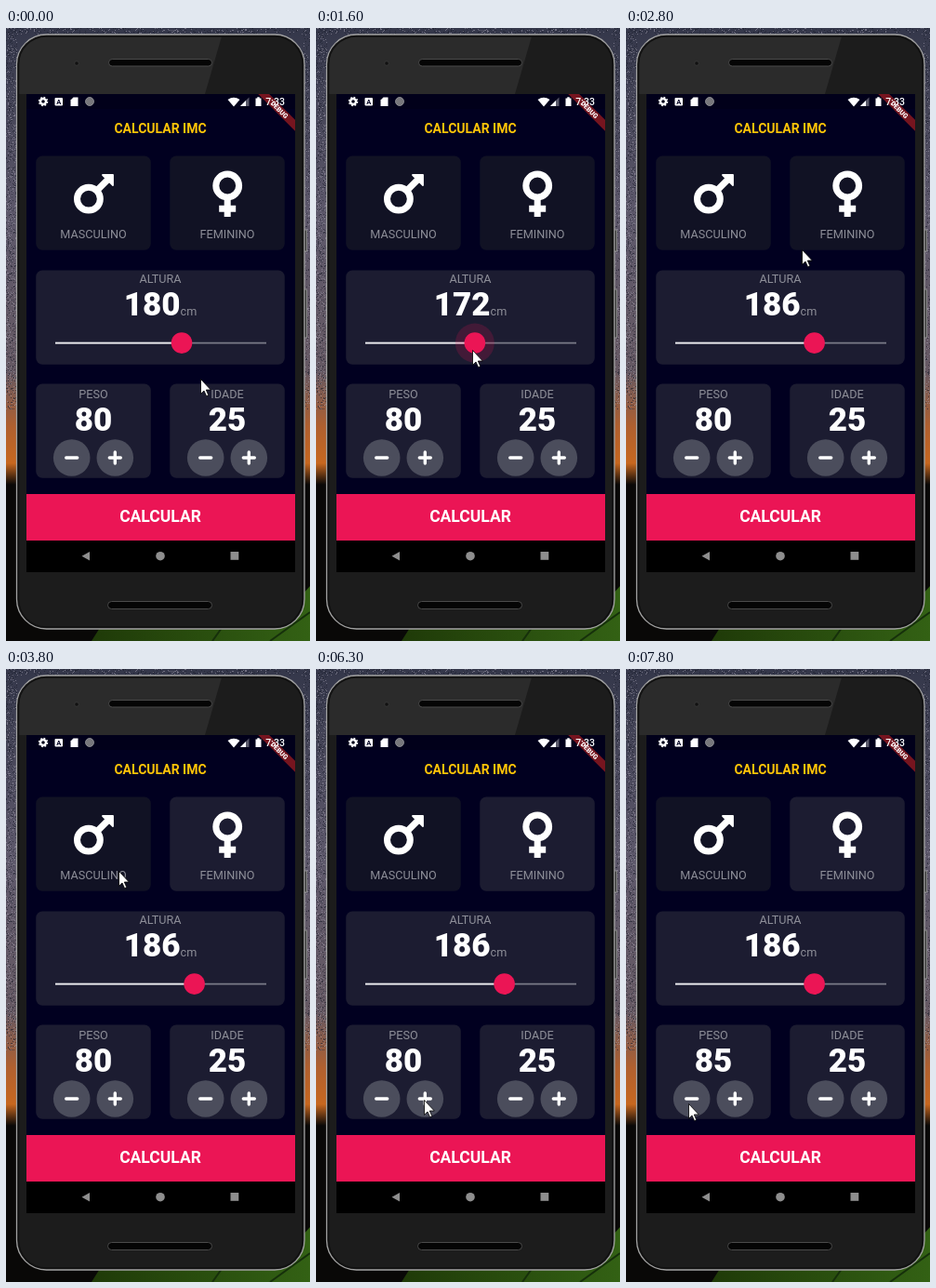
An HTML page that plays this animation: 327 by 659 pixels, repeating every 8 s.

```html
<!DOCTYPE html>
<html lang="pt">
<head>
<meta charset="utf-8">
<title>Calcular IMC</title>
<style>
  html, body { margin: 0; width: 100%; height: 100%; overflow: hidden; background: #090807; }
  svg { display: block; width: 327px; height: 659px; font-family: Roboto, sans-serif; }
  text { text-anchor: middle; }
  .card { fill: #1c1c31; }
  .off { fill: #111224; }
  .label { font-size: 12.65px; fill: #8d8e98; }
  .num { font-size: 35px; font-weight: 900; fill: #fff; }
  .icon { fill: none; stroke: #fff; stroke-width: 7; }
  .sign { stroke: #fff; stroke-width: 3.4; stroke-linecap: round; }
</style>
</head>
<body>
<svg viewBox="0 0 327 659">
  <defs>
    <linearGradient id="sky" x2="0" y2="1">
      <stop offset="0" stop-color="#34374a"/>
      <stop offset=".3" stop-color="#5d586b"/>
      <stop offset=".56" stop-color="#665963"/>
      <stop offset=".65" stop-color="#b0602f"/>
      <stop offset=".71" stop-color="#c7671f"/>
      <stop offset=".745" stop-color="#090807"/>
    </linearGradient>
    <linearGradient id="tent">
      <stop offset="0" stop-color="#1f3a08"/>
      <stop offset="1" stop-color="#336114"/>
    </linearGradient>
    <clipPath id="screen"><path d="M22 71H311V585H22Z"/></clipPath>
  </defs>

  <!-- Night landscape -->
  <rect width="327" height="659" fill="url(#sky)"/>
  <path id="dark" fill="#1a1d2b" opacity=".6"/>
  <path id="light" fill="#aaa6b6" opacity=".5"/>
  <path d="M92 659L104 640H290L327 600V659Z" fill="url(#tent)"/>
  <path d="M327 628L284 659M232 645L222 659" stroke="#16300b" stroke-width="2"/>

  <!-- Phone -->
  <path d="M320 217h3.500v23H320zM320 281h3.500v52H320z" fill="#333" stroke="#8c8c8c"/>
  <rect x="11.500" y="7" width="309.500" height="639" rx="32" fill="#1c1c1c" stroke="#a2a2a2" stroke-width="1.300"/>
  <path d="M13.500 71V40Q14 9 44 9H232L214 71Z" fill="#2b2b2b"/>
  <rect x="13.500" y="9" width="305.500" height="635" rx="30" fill="none" stroke="#111" stroke-width="1.500"/>
  <circle cx="76" cy="38" r="2.300" fill="#111" stroke="#3c3c3c" stroke-width=".8"/>
  <g fill="#050505" stroke="#4a4a4a">
    <rect x="110.500" y="33.500" width="111" height="7.500" rx="3.700"/>
    <rect x="109.500" y="616.500" width="112" height="8" rx="4"/>
  </g>

  <!-- Screen and status bar -->
  <g clip-path="url(#screen)">
    <rect width="327" height="659" fill="#010020"/>
    <rect width="327" height="87" fill="#01001a"/>
    <g transform="rotate(45 311 71)">
      <path d="M271 90.700h80v8.400h-80z" fill="#76151f"/>
      <text x="311" y="97.400" font-size="7.200" font-weight="900" fill="#fff">DEBUG</text>
    </g>
  </g>
  <g fill="#fff">
    <circle cx="40" cy="79" r="3" fill="none" stroke="#fff" stroke-width="2.400"/>
    <circle cx="40" cy="79" r="4.600" fill="none" stroke="#fff" stroke-width="1.300" stroke-dasharray="1.800 1.810"/>
    <rect x="52.500" y="75" width="8.500" height="8.500" rx="1"/>
    <text x="56.750" y="82" font-size="7.500" font-weight="700" fill="#010020">A</text>
    <path d="M72.500 74.500h5v9.500h-8v-6.500z"/>
    <circle cx="90" cy="79" r="4.500" fill="#77777b" stroke="#98989c" stroke-width=".8"/>
    <path d="M238.500 77q6.500-4.500 13 0L245 84.500z"/>
    <path d="M261.500 74.500V84H252z" opacity=".35"/>
    <path d="M258 78V84H252z"/>
    <path d="M268.500 75.500h1.800v-1.200h2.400v1.200h1.800V84h-6z"/>
    <text x="289.500" y="83" font-size="10.500" font-weight="500">7:33</text>
  </g>
  <text x="166" y="112.500" font-size="14" font-weight="700" fill="#ffc507">CALCULAR IMC</text>

  <g id="cards"></g>

  <!-- Gender icons -->
  <circle class="icon" cx="88.900" cy="183.700" r="12.400"/>
  <path class="icon" d="M98 174.500L111 161.500"/>
  <path d="M104 158h11v11z" fill="#fff" stroke="#fff" stroke-width="1.800" stroke-linejoin="round"/>
  <circle class="icon" cx="238.200" cy="169.500" r="12.400"/>
  <path class="icon" d="M238.200 183v20M229.200 194.200h18"/>

  <!-- Height slider -->
  <text x="166" y="309"><tspan id="height" class="num">180</tspan><tspan class="label">cm</tspan></text>
  <path d="M53 338.600H280" stroke="#7a7b88" stroke-width="1.600"/>
  <path id="track" stroke="#ececf0" stroke-width="1.800"/>
  <g id="knob" fill="#eb1555">
    <circle id="halo" opacity=".18"/>
    <circle r="11.300"/>
  </g>

  <path d="M22 501H311V551H22Z" fill="#eb1555"/>
  <text x="166" y="530.500" font-size="17.500" font-weight="700" fill="#fff">CALCULAR</text>
  <path d="M22 551H311V585H22Z"/>
  <g fill="#8e8e8e">
    <path d="M90 563v9.500l-8.500-4.750z"/>
    <circle cx="166" cy="567.700" r="4.800"/>
    <path d="M241.500 563h8.800v8.800h-8.800z"/>
  </g>

  <path id="cursor" d="M.5.5V16.300L4 13 6.600 18.700 8.800 17.800 6.300 12H11.300Z" fill="#fff" stroke="#000" stroke-width=".8"/>
</svg>

<script>
const $ = id => document.getElementById(id);
const clamp = (v, lo, hi) => Math.min(hi, Math.max(lo, v));
const LOOP = 8000, STEP = 100;
const LEFT = 94, RIGHT = 238, MIDDLE = 166;

// Static parts
const card = (id, cx, y, w, label, labelY) =>
  `<rect id="${id}" class="card" x="${cx - w / 2}" y="${y}" width="${w}" height="101.3" rx="7"/>
   <text class="label" x="${cx}" y="${labelY}">${label}</text>`;

const button = (id, x, sign) =>
  `<g transform="translate(${x} 462)"><circle id="${id}" r="19.8" fill="#4b4d5c"/>
   <path class="sign" d="${sign}"/></g>`;

const counter = (id, cx, label, value) =>
  card(id + 'Card', cx, 382.5, 123.5, label, 398) +
  `<text id="${id}" class="num" x="${cx}" y="433">${value}</text>` +
  button(id + 'Minus', cx - 23.3, 'M-6 0H6') +
  button(id + 'Plus', cx + 23.3, 'M-6 0H6M0-6V6');

$('cards').innerHTML =
  card('male', LEFT, 137.5, 123.5, 'MASCULINO', 226) +
  card('female', RIGHT, 137.5, 123.5, 'FEMININO', 226) +
  card('heightCard', MIDDLE, 260.5, 267.5, 'ALTURA', 273.5) +
  counter('weight', LEFT, 'PESO', 80) +
  counter('age', RIGHT, 'IDADE', 25);

function speckle(id, seed, count) {
  const rnd = () => (seed = (seed * 16807) % 2147483647) / 2147483647;
  let d = '';
  for (let i = 0; i < count; i++) {
    const side = rnd();
    const x = side < .55 ? rnd() * 12 : side < .8 ? 320 + rnd() * 7 : rnd() * 327;
    const y = side < .8 ? rnd() * 410 : rnd() * 7;
    d += `M${x | 0} ${y | 0}h1v1h-1z`;
  }
  $(id).setAttribute('d', d);
}
speckle('dark', 11, 1100);
speckle('light', 47, 800);

// Cursor: moves between stops, steady while dragging and slowing down otherwise
const home = { x: 209, y: 377 };
const moves = [
  { from: 0, to: 100, x: 196, y: 360 },
  { from: 200, to: 500, x: 184, y: 345 },
  { from: 1200, to: 2000, x: 152, y: 346, drag: true },
  { from: 2000, to: 2370, x: 201, y: 345, drag: true },
  { from: 2500, to: 3000, x: 187, y: 218 },
  { from: 3600, to: 3800, x: 121, y: 217 },
  { from: 4400, to: 4700, x: 195, y: 207 },
  { from: 5400, to: 6000, x: 133, y: 453 },
  { from: 6200, to: 6300, x: 116, y: 463 },
  { from: 7500, to: 7800, x: 67, y: 467 }
];

function cursorAt(t) {
  let { x, y } = home;
  for (const m of moves) {
    const p = clamp((t - m.from) / (m.to - m.from), 0, 1);
    const e = m.drag ? p : p * (2 - p);
    x += (m.x - x) * e;
    y += (m.y - y) * e;
  }
  return { x, y };
}

// Rises from 0 to 1 after `from` and falls back to 0 at `to`
const pulse = (t, from, to, ramp) => clamp(Math.min(t - from, to - t) / ramp, 0, 1);

// Slider scale: 120 to 220 cm
const TRACK = 52.8, PER_CM = 2.27, GRIP = 2;
const PRESS = 1100, RELEASE = 2500;

function draw(t) {
  const { x, y } = cursorAt(t);
  $('cursor').setAttribute('transform', `translate(${Math.round(x)} ${Math.round(y)})`);

  const gripX = cursorAt(Math.min(t, RELEASE)).x + GRIP;
  const height = t < PRESS ? 180 : Math.round(120 + (gripX - TRACK) / PER_CM);
  const knobX = TRACK + (height - 120) * PER_CM;
  $('height').textContent = height;
  $('track').setAttribute('d', `M53 338.6H${knobX}`);
  $('knob').setAttribute('transform', `translate(${knobX} 338.6)`);
  $('halo').setAttribute('r', 21 * pulse(t, 1000, 2800, 250));

  const male = t >= 4200 && t < 4900;
  $('male').classList.toggle('off', !male);
  $('female').classList.toggle('off', t < 3400 || male);

  $('weight').textContent = 80 + clamp(Math.floor((t - 6750) / 150), 0, 5);
  const glow = 22 * pulse(t, 6500, 7700, 200);
  $('weightPlus').setAttribute('fill', `rgb(${75 + glow} ${77 + glow} ${92 + glow})`);
}

const start = performance.now();
function tick() {
  const t = (performance.now() - start) % LOOP;
  draw(Math.floor(t / STEP) * STEP);
  requestAnimationFrame(tick);
}
tick();
</script>
</body>
</html>
```
